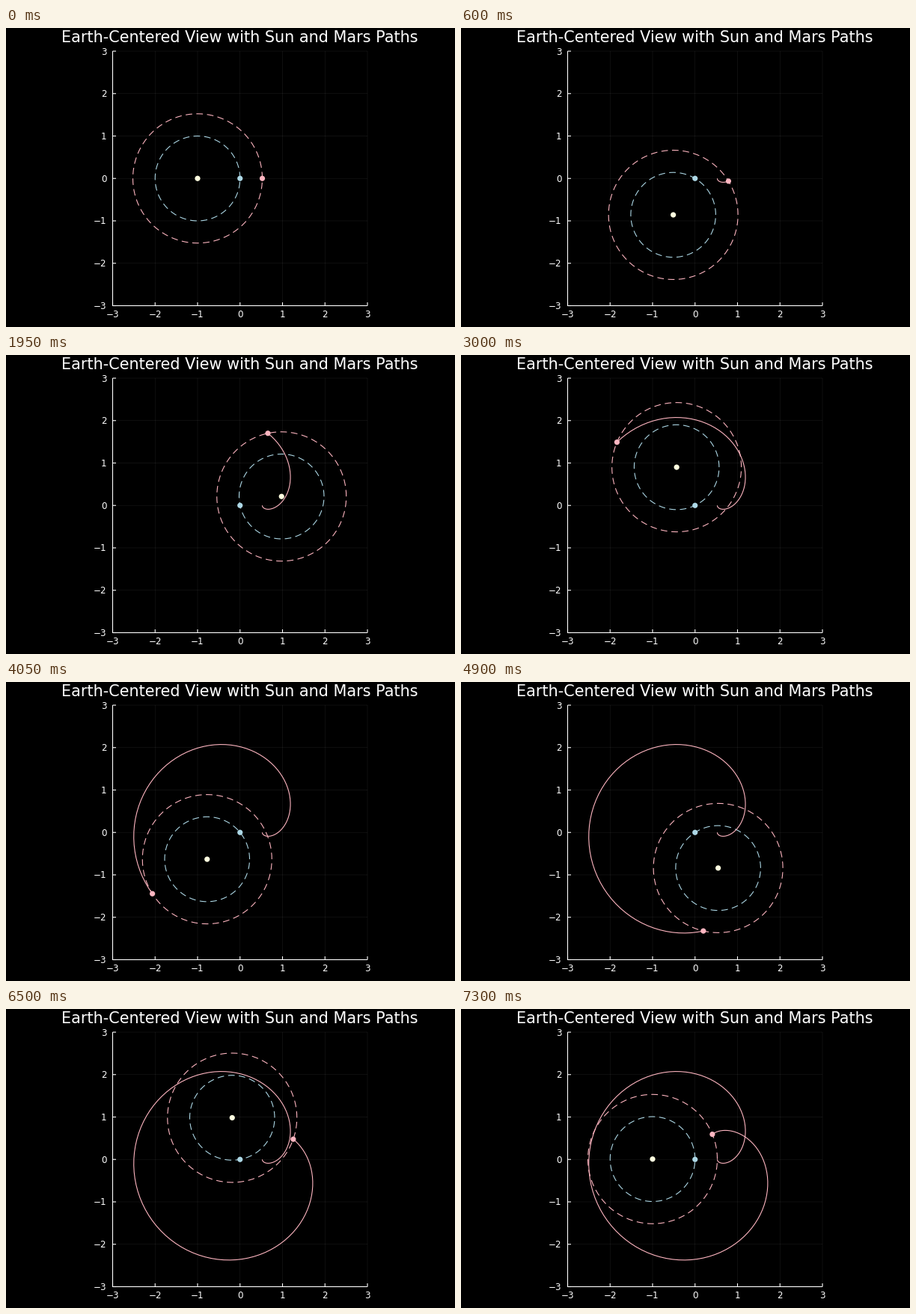
These frames come from a looping animation (600x400 px, 7350 ms). A matplotlib script:

```python
import numpy as np
import matplotlib.pyplot as plt
from matplotlib.animation import FuncAnimation
from matplotlib.patches import Circle

W, H, DPI = 600, 400, 100
PT = 72 / DPI  # points per pixel

FRAMES, STEP_MS, STEP_DAYS = 147, 50, 5
EARTH_R, EARTH_YEAR = 1.0, 365.25
MARS_R, MARS_YEAR = 1.524, 687.0

SUN_COLOR, EARTH_COLOR, MARS_COLOR = "lightyellow", "lightblue", "lightpink"

# Plot area in pixels, spanning -3..3 on both axes
LEFT, TOP, SIDE = 142.5, 31, 340.5
LIM = 3
U = 2 * LIM / SIDE  # data units per pixel


def orbit(radius, period, days):
    angle = 2 * np.pi * days / period
    return radius * np.cos(angle), radius * np.sin(angle)


days = np.arange(FRAMES) * STEP_DAYS
earth_x, earth_y = orbit(EARTH_R, EARTH_YEAR, days)
mars_x, mars_y = orbit(MARS_R, MARS_YEAR, days)

# Everything is seen from Earth
sun_x, sun_y = -earth_x, -earth_y
mars_x, mars_y = mars_x - earth_x, mars_y - earth_y

plt.rcParams["font.family"] = "DejaVu Sans"
fig = plt.figure(figsize=(W / DPI, H / DPI), dpi=DPI, facecolor="black")
ax = fig.add_axes([LEFT / W, 1 - (TOP + SIDE) / H, SIDE / W, SIDE / H])
ax.set(xlim=(-LIM, LIM), ylim=(-LIM, LIM))
ax.axis("off")


def line(x, y, width=1.1, **style):
    return ax.plot(x, y, lw=width * PT, snap=False, clip_on=False,
                   solid_capstyle="butt", **style)[0]


def label(x, y, text, **align):
    ax.text(x, y, text, color="white", fontsize=11.9 * PT, **align)


for k in range(-LIM, LIM + 1):
    line([k, k], [-LIM, LIM], 0.6, color="white", alpha=0.1)
    line([-LIM, LIM], [k, k], 0.6, color="white", alpha=0.1)
    line([k, k], [-LIM, -LIM + 4.5 * U], color="white")
    line([-LIM, -LIM + 4.5 * U], [k, k], color="white")
    name = str(k).replace("-", "\u2212")
    label(k, -LIM - 15.5 * U, name, ha="center", va="baseline")
    label(-LIM - 8 * U, k + 0.5 * U, name, ha="right", va="center_baseline")
line([-LIM, -LIM, LIM], [LIM, -LIM, -LIM], color="white")

fig.text((LEFT + SIDE / 2) / W, 1 - 18.8 / H,
         "Earth-Centered View with Sun and Mars Paths",
         color="white", fontsize=20.8 * PT, ha="center", va="baseline")

turn = np.linspace(0, 2 * np.pi, 201)


def make_ring(color):
    return line([], [], color=color, ls=(0, (8, 5)), dash_capstyle="butt")


def make_dot(color, zorder):
    return ax.add_patch(Circle((0, 0), 3.6 * U, facecolor=color,
                               edgecolor="none", zorder=zorder))


earth_ring = make_ring(EARTH_COLOR)
mars_ring = make_ring(MARS_COLOR)
trail = line([], [], color=MARS_COLOR)
sun = make_dot(SUN_COLOR, 4)
earth = make_dot(EARTH_COLOR, 5)
mars = make_dot(MARS_COLOR, 6)


def update(i):
    for ring, radius in ((earth_ring, EARTH_R), (mars_ring, MARS_R)):
        ring.set_data(sun_x[i] + radius * np.cos(turn),
                      sun_y[i] + radius * np.sin(turn))
    trail.set_data(mars_x[:i + 1], mars_y[:i + 1])
    sun.center = sun_x[i], sun_y[i]
    mars.center = mars_x[i], mars_y[i]
    return earth_ring, mars_ring, trail, sun, earth, mars


anim = FuncAnimation(fig, update, frames=FRAMES, interval=STEP_MS,
                     repeat=True, repeat_delay=0, blit=False)
plt.show()
```
